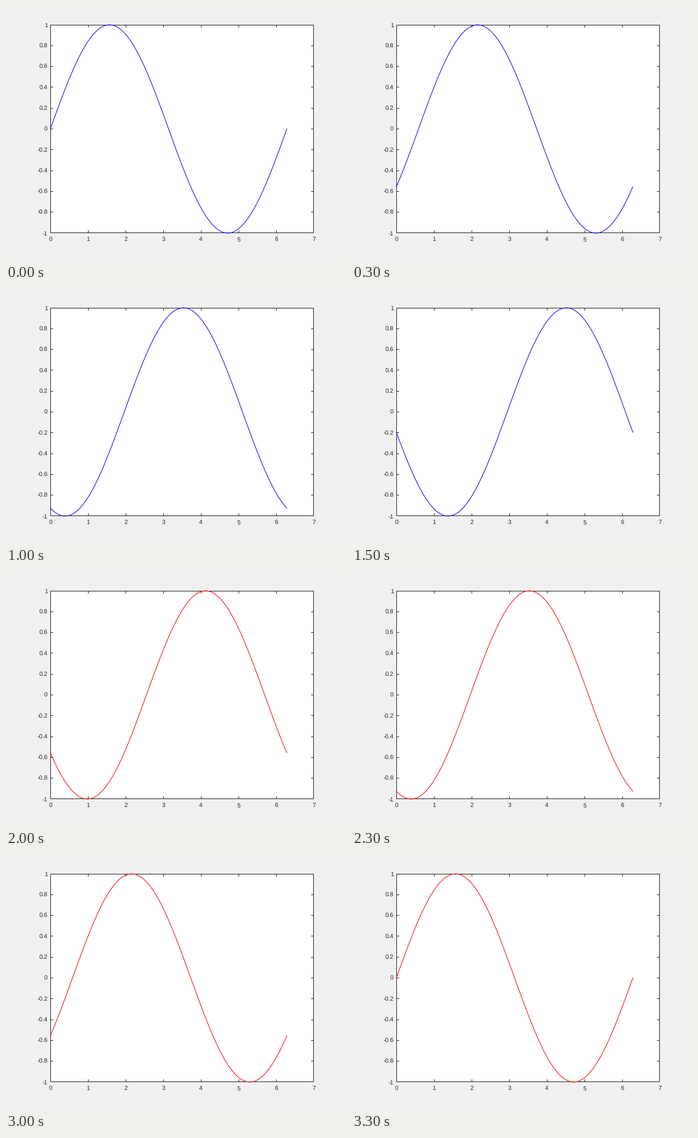
Animation, 560 px wide and 420 px high, one loop 3.4 s. Source, as a matplotlib script:

```python
import numpy as np
import matplotlib.pyplot as plt
from matplotlib.animation import FuncAnimation

W, H, DPI = 560, 420, 100
PX = 72 / DPI  # one pixel in points
HALF = 17  # frames for each direction of travel
INK = "#262626"

plt.rcParams.update({"font.family": "Liberation Sans", "font.size": 10 * PX,
                     "text.hinting": "none"})


def label(value, _):
    return f"{value:g}"


def panel(left, top, right, bottom):
    """Axes over a pixel rectangle measured from the top left corner."""
    ax = fig.add_axes([left / W, 1 - bottom / H, (right - left) / W, (bottom - top) / H])
    ax.set(xlim=(0, 7), ylim=(-1, 1), xticks=range(8), yticks=np.arange(-5, 6) / 5)
    return ax


fig = plt.figure(figsize=(W / DPI, H / DPI), dpi=DPI, facecolor="#f0f0f0")

# The box and its ticks snap to whole pixels just inside the plot area.
frame = panel(72.8, 30.52, 506.48, 373.46)
frame.tick_params(direction="in", top=True, right=True, length=4.3 * PX, width=PX,
                  color=INK, labelleft=False, labelbottom=False)
frame.spines[:].set(linewidth=PX, color=INK)

# The curve and the labels use the exact plot area.
plot = panel(73, 31, 507, 374)
plot.patch.set_visible(False)
plot.spines[:].set_visible(False)
plot.tick_params(length=0, labelcolor=INK)
plot.tick_params(axis="x", pad=6.2 * PX)
plot.tick_params(axis="y", pad=4.5 * PX)
plot.xaxis.set_major_formatter(label)
plot.yaxis.set_major_formatter(label)

x = np.linspace(0, 2 * np.pi, 101)
wave, = plot.plot(x, np.sin(x), linewidth=PX, clip_on=False)


def update(i):
    """Slide the wave right by half a period in blue, then back in red."""
    forward = i < HALF
    step = i if forward else 2 * HALF - 1 - i
    wave.set_ydata(np.sin(x - step * np.pi / (HALF - 1)))
    wave.set_color("#0000ff" if forward else "#ff0000")
    return wave,


anim = FuncAnimation(fig, update, frames=2 * HALF, interval=100, repeat=True)
plt.show()
```
